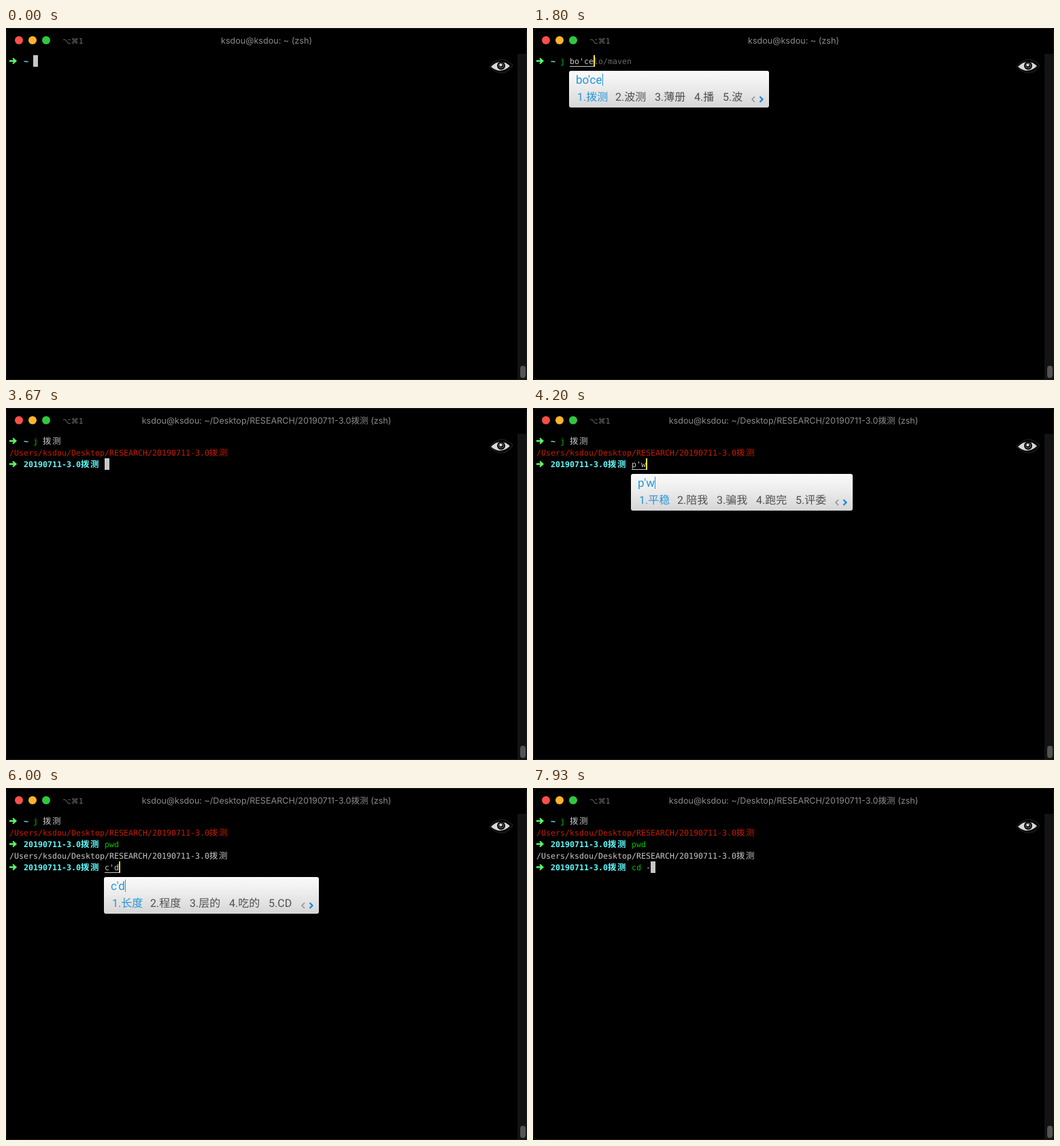
Write an HTML page that moves like this. It is 766 px wide and 518 px high and loops after 8000 ms.

```html
<!DOCTYPE html>
<html lang="en">
<head>
<meta charset="utf-8">
<title>Terminal</title>
<style>
html, body { margin: 0; width: 100%; height: 100%; overflow: hidden; background: #000; }
svg { display: block; width: 766px; height: 518px; }
text { white-space: pre; text-rendering: geometricPrecision; }
.mono { font: 11.63px "DejaVu Sans Mono", "Noto Sans CJK SC", monospace; }
.wide { font: 12.5px "Noto Sans CJK SC", "Noto Sans CJK", sans-serif; }
.bold { font-weight: 700; }
.title { font: 12.6px Inter, "Noto Sans CJK SC", "Noto Sans CJK", sans-serif; fill: #8c8c8c; }
.keys { font: 11px "DejaVu Sans", sans-serif; fill: #6e6e6e; }
.ime { font: 16px Roboto, "Noto Sans CJK SC", "Noto Sans CJK", sans-serif; fill: #505050; }
.ime.input { font-size: 17px; }
.ime.picked { fill: #2496dc; }
</style>
</head>
<body>
<svg viewBox="0 0 766 518" xmlns="http://www.w3.org/2000/svg">
  <defs>
    <linearGradient id="paper" x2="0" y2="1">
      <stop offset="0" stop-color="#fafafa"/>
      <stop offset=".45" stop-color="#ececec"/>
      <stop offset="1" stop-color="#d6d6d6"/>
    </linearGradient>
  </defs>
  <rect width="766" height="518" fill="#000"/>
  <rect x="752" y="38" width="14" height="480" fill="#131313"/>
  <rect x="756" y="497" width="8" height="18" rx="4" fill="#545454"/>
  <rect x=".5" y=".5" width="765" height="517" rx="5" fill="none" stroke="#1e1e1e"/>
  <circle cx="19" cy="18" r="6" fill="#fc5048"/>
  <circle cx="39" cy="18" r="6" fill="#fdb42c"/>
  <circle cx="59" cy="18" r="6" fill="#30c840"/>
  <text class="keys" x="83" y="22.5">⌥⌘1</text>
  <text class="title" id="title" x="383" y="22.5" text-anchor="middle"></text>
  <g id="eye">
    <path d="M711 57Q728 37 745 55Q731 76 711 57Z" fill="none" stroke="#1c1c1c" stroke-width="1.5"/>
    <path d="M713 57Q727 43 741 56Q727 69 713 57Z" fill="#d8d8d8"/>
    <circle cx="728" cy="55.5" r="6" fill="#080808"/>
    <circle cx="728" cy="55.5" r="3.6" fill="none" stroke="#8a8a8a" stroke-width=".8"/>
    <circle cx="727.5" cy="54.5" r="2" fill="#dedede"/>
  </g>
  <g id="screen"></g>
</svg>
<script>
const LOOP = 8000, CELL = 7, LINE = 17;
const COLOR = { green: '#00c200', cyan: '#60fdff', text: '#c7c7c7', red: '#c91b00', ghost: '#686868', ink: '#000' };
const USER = 'ksdou';
const DIR = '20190711-3.0拨测';
const PATH = `/Desktop/RESEARCH/${DIR}`;
const GHOST = '/usr/lo/maven';

const idle = { typed: '', ghost: '', ime: '', words: '' };
// Each step changes part of the state; ran counts finished commands.
const steps = [
  [0, { ...idle, ran: 0 }],
  [270, { typed: 'j', ghost: ' ' + GHOST }],
  [600, { typed: 'j ', ghost: GHOST }],
  [1195, { ime: 'b', words: '吧 不 🙅 把 o(>__<)o千万别' }],
  [1400, { ime: 'bo', words: '波 播 拨 博 伯' }],
  [1600, { ime: "bo'c", words: '拨测 播出 博彩 波长 拨出' }],
  [1730, { ime: "bo'ce", words: '拨测 波测 薄册 播 波' }],
  [2125, { typed: 'j 拨', ime: '', words: '' }],
  [2195, { typed: 'j 拨测', ghost: '' }],
  [3265, { ...idle, ran: 1 }],
  [4065, { ime: 'p', words: '平 怕 片 跑 陪' }],
  [4195, { ime: "p'w", words: '平稳 陪我 骗我 跑完 评委' }],
  [4395, { ime: "p'w'd", words: '陪我的 排位的 骗我的 平稳 陪我' }],
  [4595, { typed: 'pwd', ime: '', words: '' }],
  [4865, { ...idle, ran: 2 }],
  [5795, { ime: 'c', words: '从 次 才 错 成' }],
  [5930, { ime: "c'd", words: '长度 程度 层的 吃的 CD' }],
  [6400, { typed: 'cd', ime: '', words: '' }],
  [6730, { typed: 'cd ' }],
  [7130, { typed: 'cd -' }],
];
const states = [];
for (const [at, patch] of steps) states.push({ ...states.at(-1), ...patch, at });

const escape = s => s.replace(/&/g, '&amp;').replace(/</g, '&lt;');
const isWide = c => c > '\u2e80';
const sum = (list, f) => list.reduce((n, v) => n + f(v), 0);
const cols = s => sum([...s], c => isWide(c) ? 2 : 1);
const colX = col => 5 + col * CELL;
const label = (x, y, s, cls) => `<text class="${cls}" x="${x}" y="${y}">${escape(s)}</text>`;
const box = (x, y, w, h, fill, rx = 0) =>
  `<rect x="${x}" y="${y}" width="${w}" height="${h}" rx="${rx}" fill="${fill}"/>`;

// Terminal text: every glyph sits on the cell grid.
function cells(col, row, s, color, cls = '') {
  return (s.match(/[\x00-\x7f]+|[^\x00-\x7f]+/g) || []).map(run => {
    const xs = [...run].map(c => {
      const x = colX(col);
      col += cols(c);
      return x;
    });
    const font = isWide(run) ? 'wide' : 'mono';
    return `<text class="${font} ${cls}" x="${xs.join(' ')}" y="${53 + row * LINE}" fill="${COLOR[color]}">${escape(run)}</text>`;
  }).join('');
}

function prompt(row, dir) {
  const y = 48.5 + row * LINE;
  return `<path d="M5 ${y - 1.2}h6l-1.6-2.2 1.4-1.4L16 ${y}l-5.2 4.8-1.4-1.4 1.6-2.2h-6z" fill="#5ffa68"/>`
    + cells(3, row, dir, 'cyan', 'bold');
}

function command(col, row, s) {
  const [name] = s.split(' ');
  return cells(col, row, name, 'green') + cells(col + name.length, row, s.slice(name.length), 'text');
}

function emoji(x, y) {
  return `<g transform="translate(${x} ${y})">
    <path d="M1 19Q1 11 9.5 11T18 19Z" fill="#2f86c4"/>
    <path d="M3 8Q3 0 9.5 0T16 8L17 13H2Z" fill="#c98212"/>
    <circle cx="9.5" cy="8" r="5.2" fill="#ffd04a"/>
    <path d="M7 7.5h1.5M10.5 7.5h1.5M8 10.5h3" stroke="#6b4510"/>
    <path d="M2 10L16 18M17 10L3 18" stroke="#1f6c9c" stroke-width="2.5"/>
    <circle cx="2" cy="9.5" r="1.8" fill="#ffd04a"/><circle cx="17" cy="9.5" r="1.8" fill="#ffd04a"/>
    <rect x="22" y="2.5" width="8" height="6" rx="1" fill="none" stroke="#505050"/>
    <path d="M23.5 5.5h5" stroke="#505050" stroke-dasharray="1 1"/>
  </g>`;
}

const wordWidth = w => w === '🙅' ? 31 : sum([...w], c => isWide(c) ? 16 : /[A-Z]/.test(c) ? 11 : 8.4);

function popup(col, row, input, words) {
  const left = colX(col) - 1, top = 63 + row * LINE, base = top + 44;
  let x = left + 12, items = '', end = x;
  words.split(' ').forEach((word, i) => {
    const isIcon = word === '🙅', width = wordWidth(word);
    items += label(x, base, `${i + 1}.${isIcon ? '' : word}`, i ? 'ime' : 'ime picked');
    if (isIcon) items += emoji(x + 13, top + 28);
    end = x + 12 + width;
    x += width + (i ? 26 : 24);
  });
  const chevron = (cx, dir, color, w) =>
    `<path d="M${cx - 2 * dir} ${top + 38}l${4 * dir} 4 ${-4 * dir} 4" fill="none" stroke="${color}" stroke-width="${w}"/>`;
  return box(left, top, end + 40 - left, 54, 'url(#paper)', 3)
    + label(left + 10, top + 19, input, 'ime input picked')
    + `<rect id="caret" y="${top + 4}" width="1" height="18" fill="#2496dc"/>`
    + items + chevron(end + 17, -1, '#909090', 1.5) + chevron(end + 28.5, 1, '#1787d4', 2.2);
}

function screen({ ran, typed, ghost, ime, words }) {
  const row = ran * 2, start = ran ? 20 : 5, top = 40 + row * LINE;
  let out = prompt(0, '~');
  if (ran) out += command(5, 0, 'j 拨测') + cells(0, 1, `/Users/${USER}${PATH}`, 'red') + prompt(2, DIR);
  if (ran > 1) out += command(20, 2, 'pwd') + cells(0, 3, `/Users/${USER}${PATH}`, 'text') + prompt(4, DIR);
  out += command(start, row, typed);
  const col = start + cols(typed), x = colX(col);
  if (ime) {
    const width = ime.length * CELL;
    return out + cells(col + ime.length, row, ghost.slice(ime.length), 'ghost')
      + cells(col, row, ime, 'text')
      + box(x, top + 16, width, 1, COLOR.text) + box(x + width, top, 2, 17, '#ffe73c')
      + popup(col, row, ime, words);
  }
  return out + box(x, top, CELL, 17, ghost ? '#fff' : COLOR.text)
    + cells(col, row, ghost.slice(0, 1), 'ink') + cells(col + 1, row, ghost.slice(1), 'ghost');
}

const titleNode = document.getElementById('title');
const screenNode = document.getElementById('screen');
let shown;

function render(state) {
  titleNode.textContent = `${USER}@${USER}: ~${state.ran ? PATH : ''} (zsh)`;
  screenNode.innerHTML = screen(state);
  const caret = document.getElementById('caret');
  if (caret) {
    const input = screenNode.querySelector('.input');
    caret.setAttribute('x', Math.round(+input.getAttribute('x') + input.getComputedTextLength()));
  }
}

function tick() {
  const time = performance.now() % LOOP;
  const state = states.findLast(s => s.at <= time);
  if (state !== shown) render(shown = state);
  requestAnimationFrame(tick);
}
tick();
</script>
</body>
</html>
```
